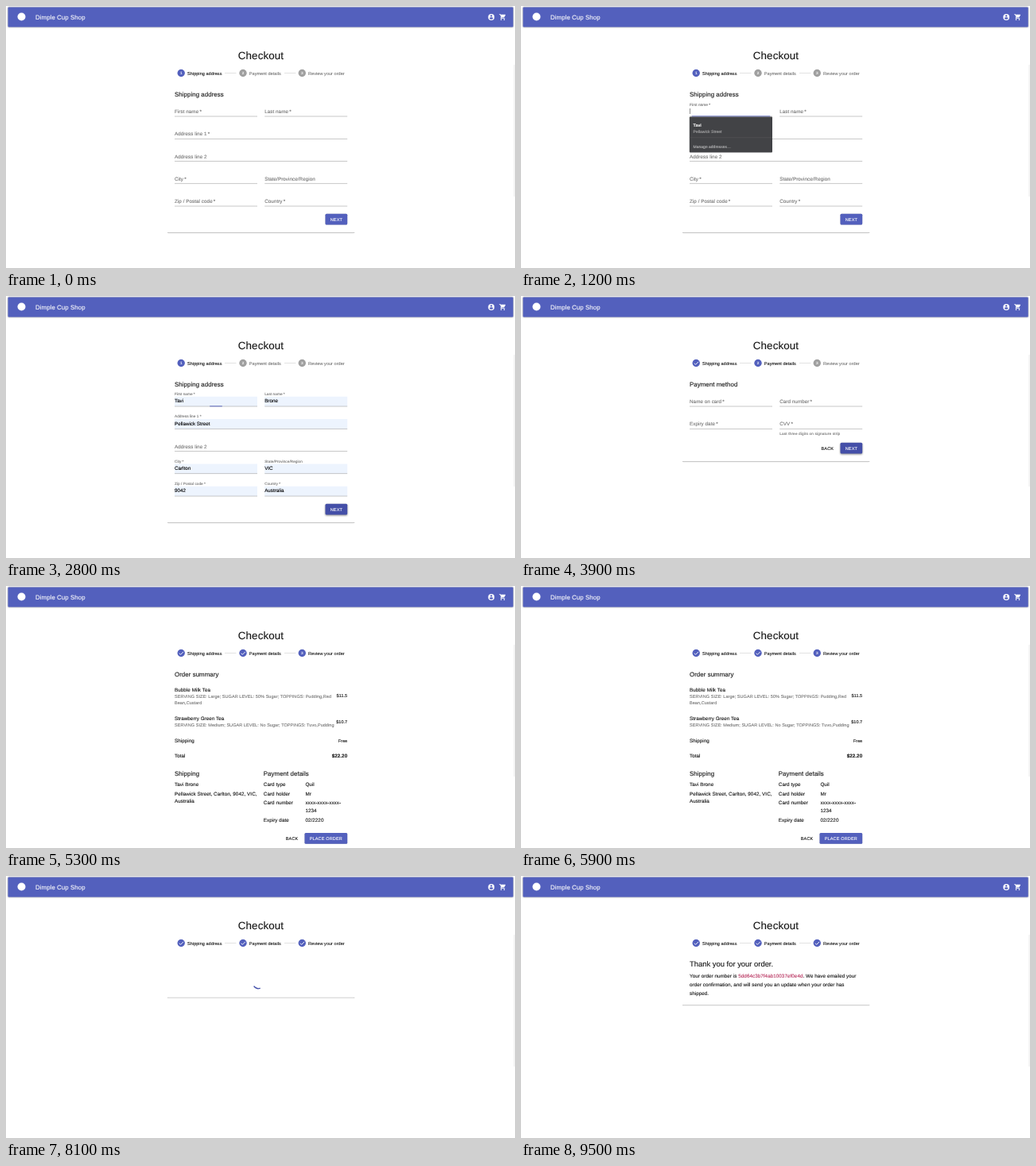
Recreate the animation shown at these times as an HTML page. Size 640 px wide and 330 px high, loop 9.6 s.

```html
<!DOCTYPE html>
<html lang="en">
<head>
<meta charset="utf-8">
<title>Checkout</title>
<style>
  html, body { margin: 0; width: 100%; height: 100%; overflow: hidden; background: #fff; }
  svg { display: block; width: 640px; height: 330px; }
  text {
    font-family: "Liberation Sans", Arial, sans-serif;
    text-rendering: geometricPrecision; white-space: pre;
  }
  text, tspan { fill: currentColor; stroke: currentColor; stroke-width: .12px; }
  .bar { filter: drop-shadow(0 .9px .9px #0006); }
</style>
</head>
<body>
<svg id="stage" viewBox="0 0 640 330"></svg>
<script>
const LOOP = 9600, STEP = 100;
const BLUE = '#5360bd', DARK = [68, 79, 168], LIGHT = [83, 96, 189];
const INK = '#161616', GREY = '#767676';
const BODY = 6.28, SMALL = 5.5, CAPTION = 4.71, HEAD = 7.85;
const LEFT = 212, RIGHT = 325.2, HALF = 104, FULL = 217.2, EDGE = 429.2;
const stage = document.getElementById('stage');

const person = { first: 'Tavi', last: 'Brone', street: 'Pellawick Street', city: 'Carlton', zip: '9042' };
const cart = 'M7 18c-1.1 0-1.99.9-1.99 2S5.9 22 7 22s2-.9 2-2-.9-2-2-2zM1 2v2h2l3.6 7.59-1.35 2.45c-.16.28-.25.61-.25.96 0 1.1.9 2 2 2h12v-2H7.42c-.14 0-.25-.11-.25-.25l.03-.12.9-1.63h7.45c.75 0 1.41-.41 1.75-1.03l3.58-6.49c.08-.14.12-.31.12-.48 0-.55-.45-1-1-1H5.21l-.94-2H1zm16 16c-1.1 0-1.99.9-1.99 2s.89 2 1.99 2 2-.9 2-2-.9-2-2-2z';
const account = 'M12 2a10 10 0 1 0 0 20 10 10 0 0 0 0-20zm0 3a3 3 0 1 1 0 6 3 3 0 0 1 0-6zm0 14.2c-2.5 0-4.71-1.28-6-3.22.03-1.99 4-3.08 6-3.08 1.99 0 5.97 1.09 6 3.08-1.29 1.94-3.5 3.22-6 3.22z';

const clamp = x => Math.max(0, Math.min(1, x));
const mix = (a, b, p) => a + (b - a) * p;

// cubic-bezier(x1, 0, x2, 1)
function bezier(x, x1, x2) {
  let lo = 0, hi = 1;
  for (let i = 0; i < 24; i++) {
    const s = (lo + hi) / 2, r = 1 - s;
    if (3 * r * r * s * x1 + 3 * r * s * s * x2 + s ** 3 < x) lo = s; else hi = s;
  }
  return lo * lo * (3 - 2 * lo);
}
const easeOut = (t, start, length = 200) => bezier(clamp((t - start) / length), 0, .2);
const easeInOut = x => bezier(clamp(x), .42, .58);

function text(str, x, y, size = BODY, color = INK, { anchor = 'start', weight = 400, gap = .0094 } = {}) {
  return `<text x="${x}" y="${y}" font-size="${size}" color="${color}" text-anchor="${anchor}" font-weight="${weight}" letter-spacing="${gap * size}">${str}</text>`;
}
const rect = (x, y, w, h, fill, extra = '') =>
  `<rect x="${x}" y="${y}" width="${w}" height="${h}" fill="${fill}" ${extra}/>`;
const icon = (d, x, y) => `<path d="${d}" fill="#fff" transform="translate(${x} ${y}) scale(.3925)"/>`;
const end = { anchor: 'end' };

function header() {
  return rect(2.5, 1.6, 635.2, 25, BLUE, 'rx=".8" class="bar"') +
    '<circle cx="19.5" cy="13.5" r="5" fill="#fff"/>' +
    text('Dimple Cup Shop', 37, 16.6, HEAD, '#fff') +
    icon(account, 605.5, 9.3) + icon(cart, 619.8, 9.3) +
    rect(638.5, 74, 1, 166, '#ebebeb');
}

function stepper(active) {
  const steps = [['Shipping address', 220.2], ['Payment details', 298], ['Review your order', 372.3]];
  return text('Checkout', 320.5, 67.2, 13.35, INK, { anchor: 'middle' }) +
    '<path d="M275 84.5h14.5M350 84.5h14.5" stroke="#c4c4c4" stroke-width=".5"/>' +
    steps.map(([name, x], i) =>
      `<circle cx="${x}" cy="84.5" r="4.7" fill="${i <= active ? BLUE : '#a0a0a0'}"/>` +
      (i < active
        ? `<path d="M${x - 2.4} 84.7l1.7 1.7 3.5-3.5" fill="none" stroke="#fff" stroke-width=".9"/>`
        : text(i + 1, x, 86.1, 4.6, '#fff', { anchor: 'middle' })) +
      text(name, x + 7.8, 86.5, SMALL, i <= active ? INK : GREY, { gap: .0107 })).join('');
}

const paperEdge = y => rect(203, y - .5, 235.3, .9, '#c2c2c2') + rect(204, y + .4, 233, .6, '#f0f0f0');

function button(label, x, y, hover) {
  const color = LIGHT.map((c, i) => Math.round(mix(c, DARK[i], hover)));
  const shadow = `drop-shadow(0 ${mix(.5, 1, hover)}px ${mix(.5, 1, hover)}px rgba(0,0,0,${mix(.3, .45, hover)}))`;
  return rect(x, y, EDGE - x, 13.7, `rgb(${color})`, `rx="1.5" style="filter:${shadow}"`) +
    text(label, (x + EDGE) / 2, y + 9, SMALL, '#fff', { anchor: 'middle', gap: .0286 });
}
const back = (x, y) => text('BACK', x, y, SMALL, INK, { gap: .0286 });

// Text field: shrink moves the label up, filled is the autofill state, focus scales the active underline
function field(label, x, row, { width = HALF, value = '', shrink = 0, filled = 0, focus = 0, required = true } = {}) {
  const y = 139 + row * 28.26;
  const star = required ? '<tspan dx="1.2">*</tspan>' : '';
  let out = text(label + star, x, mix(y - 3.9, y - 13.9, shrink), mix(BODY, CAPTION, shrink), GREY);
  if (filled) {
    out += rect(x, y - 12.3, width, 12.3, '#edf4fe') +
      text(value, x, y - 4.6, filled > 1 ? BODY : 4.8, '#000', { gap: 0 });
  }
  out += rect(x, y - .3, width, .6, '#a4a4a4');
  if (focus) out += rect(x + width * (1 - focus) / 2, y - .6, width * focus, .9, BLUE);
  return out;
}

function dropdown(highlight) {
  return rect(211.8, 139.4, 104.2, 45, '#424346', 'rx="1"') +
    (highlight ? rect(211.8, 141.3, 104.2, 24.2, '#5c5d5f') : '') +
    rect(211.8, 165.6, 104.2, .5, '#58595b') +
    text(person.first, 216.6, 152, 5.3, '#fff', { weight: 700, gap: 0 }) +
    text(person.street, 216.6, 159.7, 5.05, '#a9a9aa', { gap: 0 }) +
    text('Manage addresses…', 216.6, 179, 5, '#b9b9ba', { gap: 0 });
}

function addressPage(t) {
  const filled = t >= 2200 ? 2 : t >= 1700 ? 1 : 0;
  const shrink = easeOut(t, 1665);
  const auto = (value, width = HALF) => ({ value, width, shrink, filled });
  const focus = t < 2700 ? easeOut(t, 1060) : 1 - easeOut(t, 2697);
  const first = { ...auto(person.first), shrink: easeOut(t, 1060), focus: focus > .01 ? focus : 0 };
  return stepper(0) + text('Shipping address', LEFT, 113.7, HEAD) +
    field('First name', LEFT, 0, first) +
    field('Last name', RIGHT, 0, auto(person.last)) +
    field('Address line 1', LEFT, 1, auto(person.street, FULL)) +
    field('Address line 2', LEFT, 2, { width: FULL, required: false }) +
    field('City', LEFT, 3, auto(person.city)) +
    field('State/Province/Region', RIGHT, 3, { ...auto('VIC'), required: false }) +
    field('Zip / Postal code', LEFT, 4, auto(person.zip)) +
    field('Country', RIGHT, 4, auto('Australia')) +
    (t >= 1100 && t < 2200 ? rect(212.1, 129, .5, 7, '#222') : '') +
    button('NEXT', 401.5, 261.7, easeOut(t, 2500, 250)) + paperEdge(285.6) +
    (t >= 1200 && t < 2200 ? dropdown(t >= 1700) : '');
}

function paymentPage() {
  return stepper(1) + text('Payment method', LEFT, 113.7, HEAD) +
    field('Name on card', LEFT, 0) + field('Card number', RIGHT, 0) +
    field('Expiry date', LEFT, 1) + field('CVV', RIGHT, 1) +
    text('Last three digits on signature strip', RIGHT, 174.8, CAPTION, GREY, { gap: .033 }) +
    back(377.5, 193.8) + button('NEXT', 401.5, 184.7, 1) + paperEdge(208.6);
}

function reviewPage(t) {
  const note = (str, y) => text(str, LEFT, y, SMALL, GREY, { gap: .0107 });
  const price = (str, y) => text(str, EDGE, y, SMALL, INK, end);
  const pair = (name, value, y) => text(name, 323.8, y) + text(value, 376.4, y);
  const hover = t < 6000 ? 1 - easeOut(t, 4080, 250) : easeOut(t, 6160, 250);
  return stepper(2) + text('Order summary', LEFT, 113.7, HEAD) +
    text('Bubble Milk Tea', LEFT, 132.5) +
    note('SERVING SIZE: Large; SUGAR LEVEL: 50% Sugar; TOPPINGS: Pudding,Red', 141) +
    note('Bean,Custard', 149) + price('$11.5', 140.4) +
    text('Strawberry Green Tea', LEFT, 168.6) +
    note('SERVING SIZE: Medium; SUGAR LEVEL: No Sugar; TOPPINGS: Tuvo,Pudding', 177) + price('$10.7', 172.6) +
    text('Shipping', LEFT, 197) + price('Free', 196.8) +
    text('Total', LEFT, 216.4) + text('$22.20', EDGE, 216.4, BODY, INK, { anchor: 'end', weight: 700 }) +
    text('Shipping', LEFT, 239.2, HEAD) + text('Payment details', 323.8, 239.2, HEAD) +
    text(`${person.first} ${person.last}`, LEFT, 252.3) +
    text(`${person.street}, ${person.city}, ${person.zip}, VIC,`, LEFT, 264) + text('Australia', LEFT, 273.4) +
    pair('Card type', 'Quil', 252.3) + pair('Card holder', 'Mr', 264) +
    pair('Card number', 'xxxx-xxxx-xxxx-', 275.4) + text('1234', 376.4, 284.8) +
    pair('Expiry date', '02/2220', 297) +
    back(351.8, 320) + button('PLACE ORDER', 375.5, 311, hover);
}

function spinnerPage(t) {
  const turn = ((t - 6460) % 1400) / 1400;
  const grow = easeInOut(turn * 2), leave = easeInOut(turn * 2 - 1);
  const dash = mix(1, 100, grow), offset = -15 * grow - 110 * leave;
  return stepper(3) + paperEdge(153.3) +
    `<circle r="20.2" fill="none" stroke="#3f4ca8" stroke-width="3.6" stroke-dasharray="${dash} 200" stroke-dashoffset="${offset}" transform="translate(317.5 134.5) scale(.357) rotate(${360 * turn})"/>`;
}

function thanksPage() {
  return stepper(3) + text('Thank you for your order.', LEFT, 114.1, 9.42, INK, { gap: 0 }) +
    text('Your order number is <tspan color="#b8325f">5dd64c3b7f4ab10037ef0e4d</tspan>. We have emailed your', LEFT, 127.8) +
    text('order confirmation, and will send you an update when your order has', LEFT, 138.7) +
    text('shipped.', LEFT, 149.6) + paperEdge(162.8);
}

function page(t) {
  if (t < 3800) return addressPage(t);
  if (t < 4100) return paymentPage();
  if (t < 6500) return reviewPage(t);
  return t < 8500 ? spinnerPage(t) : thanksPage();
}

const start = performance.now();
let shown = -1;
function tick() {
  const t = Math.floor((performance.now() - start) % LOOP / STEP) * STEP;
  if (t !== shown) stage.innerHTML = header() + page(shown = t);
  requestAnimationFrame(tick);
}
tick();
</script>
</body>
</html>
```
